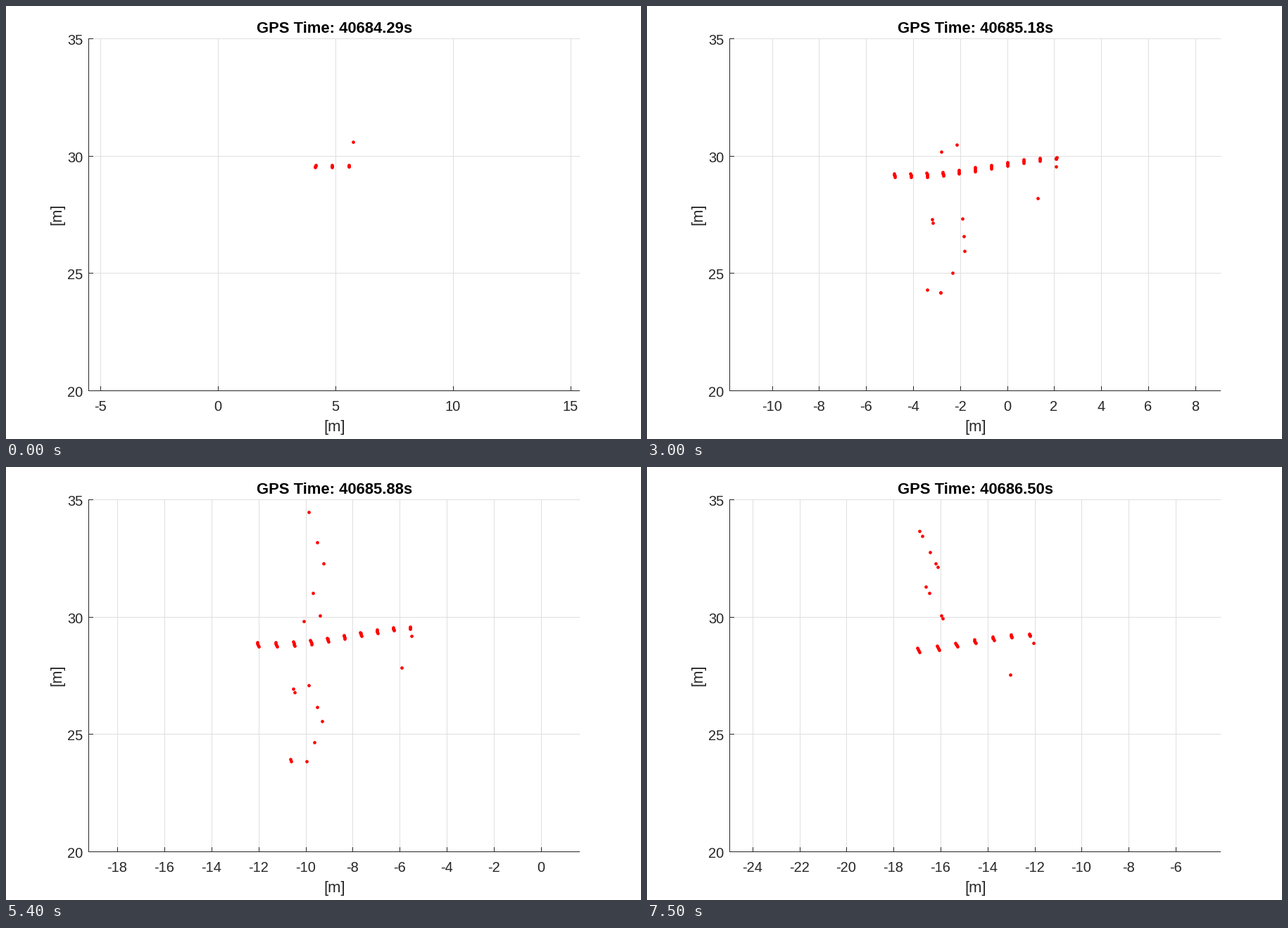
A matplotlib script that plays this animation: 902 by 615 pixels, repeating every 9.8 s.

```python
import numpy as np
import matplotlib.pyplot as plt
from matplotlib.animation import FuncAnimation
from matplotlib.collections import LineCollection

W, H, DPI = 902, 615, 100
PX = 72 / DPI                      # points per pixel
LEFT, RIGHT, TOP, BOTTOM = 117.5, 815.5, 46.5, 546.5
MID_X, SCALE = 466.3, 33.4
INK, GRID = "#262626", "#dfdfdf"
TICK_MS, STEP_MS, LOOP_MS, LAST_STEP = 100, 300, 9800, 25

BEAMS = range(-23, 9)
BEAM_ANGLE = np.radians(4 / 3)
BODY_LENGTH = 7.22
SPOTS = [(1.85, 1.08), (1.7, -1.8), (1.7, -1.95),       # engines
         (1.7, -4.8), (1.75, -4.9), (2.2, -4.9),        # near wingtip
         (6.2, -0.9), (6.9, 0.45)]                      # tailplane


def slope(beam):
    return np.tan(beam * BEAM_ANGLE)


def clock(step):
    return 40680 + np.interp(step, [0, 13, 18, 23, 25],
                             [4.29, 5.45, 5.88, 6.34, 6.50])


def nose(step):
    """Position of the aircraft's tip while it taxies left."""
    return 3.9 - 0.843 * step - 0.003 * step ** 2, 29.52 - 0.044 * step


def smoothstep(t):
    t = np.clip(t, 0, 1)
    return t * t * (3 - 2 * t)


def body_points(step):
    """Each beam leaves a short streak on the near side of the fuselage."""
    nose_x, nose_y = nose(step)
    yaw = min(1, 0.4 + 0.065 * step)
    points = []
    for beam in BEAMS:
        y = nose_y
        for _ in range(3):
            along = y * slope(beam) - nose_x
            y = nose_y + yaw * 0.8 * smoothstep((along - 1) / 6.6)
        if 0 <= along <= BODY_LENGTH:
            depth = yaw * 0.17 * (1 - (along / 8) ** 4)
            points += [(r * slope(beam), r)
                       for r in np.linspace(y, y + depth, 4)]
    return points


def wing_points(step):
    """Returns from wings, engines and tail, snapped to the nearest beam."""
    rng = np.random.default_rng(step)
    nose_x, nose_y = nose(step)
    far = np.linspace(1.5, 5.3, max(0, (step - 7) // 2))
    near = -np.linspace(1.8, 4, 4)
    edge = [(3.05 - 0.12 * abs(d) + rng.normal(0, 0.12),
             d + rng.normal(0, 0.15)) for d in (*far, *near)]
    points = []
    for along, across in SPOTS + edge:
        y = nose_y + across
        beam = np.arctan2(nose_x + along, y) / BEAM_ANGLE
        if BEAMS[0] + 0.4 < beam < BEAMS[-1] + 0.4:
            points.append((y * slope(round(beam)), y))
    return points


def to_pixel_y(y):
    return 546.2 - (np.asarray(y) - 20) * 33.36


def pixel_centre(v):
    return np.round(v) + 0.5


plt.rcParams["font.family"] = "Liberation Sans"
fig = plt.figure(figsize=(W / DPI, H / DPI), dpi=DPI, facecolor="white")
ax = fig.add_axes([0, 0, 1, 1])
ax.set(xlim=(0, W), ylim=(H, 0))
ax.axis("off")


def label(x, y, text="", size=20, color=INK, **kw):
    return ax.text(x, y, text, fontsize=size * PX, color=color,
                   **{"ha": "center", "va": "baseline", **kw})


def segments(color, z):
    # Coordinates are pixel centres already, so snapping would shift them.
    lines = LineCollection([], colors=color, linewidths=PX, zorder=z,
                           capstyle="butt", snap=False)
    ax.add_collection(lines, autolim=False)
    return lines


grid = segments(GRID, 1)
frame_lines = segments(INK, 2)
dots, = ax.plot([], [], "o", color="red", ms=4.7 * PX, mew=0, zorder=3)
title = label(466.5, 38, size=22, color="black", weight="bold")
label(467, 604, "[m]", 22)
label(78, 296, "[m]", 22, rotation=90, rotation_mode="anchor")

y_ticks = range(20, 36, 5)
y_lines = pixel_centre(to_pixel_y(y_ticks))
for value, y in zip(y_ticks, y_lines):
    label(109.5, y + 8.5, str(value), ha="right")
x_labels = [label(0, 575) for _ in range(12)]


def update(i):
    step = min(i * TICK_MS // STEP_MS, LAST_STEP)
    x, y = np.array(body_points(step) + wing_points(step)).T
    centre = (x.min() + x.max()) / 2
    dots.set_data(MID_X + (x - centre) * SCALE, to_pixel_y(y))

    gap = 5 if step == 0 else 2
    reach = (RIGHT - LEFT) / 2 / SCALE
    ticks = gap * np.arange(np.ceil((centre - reach) / gap),
                            np.floor((centre + reach) / gap) + 1)
    columns = pixel_centre(MID_X + (ticks - centre) * SCALE)

    grid.set_segments([[(c, TOP), (c, BOTTOM)] for c in columns]
                      + [[(LEFT, r), (RIGHT, r)] for r in y_lines])
    frame_lines.set_segments(
        [[(LEFT, TOP - 0.5), (LEFT, BOTTOM + 0.5)],
         [(LEFT, BOTTOM), (RIGHT - 0.5, BOTTOM)]]
        + [[(c, BOTTOM), (c, BOTTOM - 6.5)] for c in columns]
        + [[(LEFT, r), (LEFT + 6.5, r)] for r in y_lines])

    for text in x_labels:
        text.set_text("")
    for text, tick, c in zip(x_labels, ticks, columns):
        text.set_text(f"{int(tick)}")
        text.set_x(c - 0.5)
    title.set_text(f"GPS Time: {clock(step):.2f}s")
    return grid, frame_lines, dots, title, *x_labels


anim = FuncAnimation(fig, update, frames=LOOP_MS // TICK_MS,
                     interval=TICK_MS, repeat=True, repeat_delay=0, blit=False)
plt.show()
```
